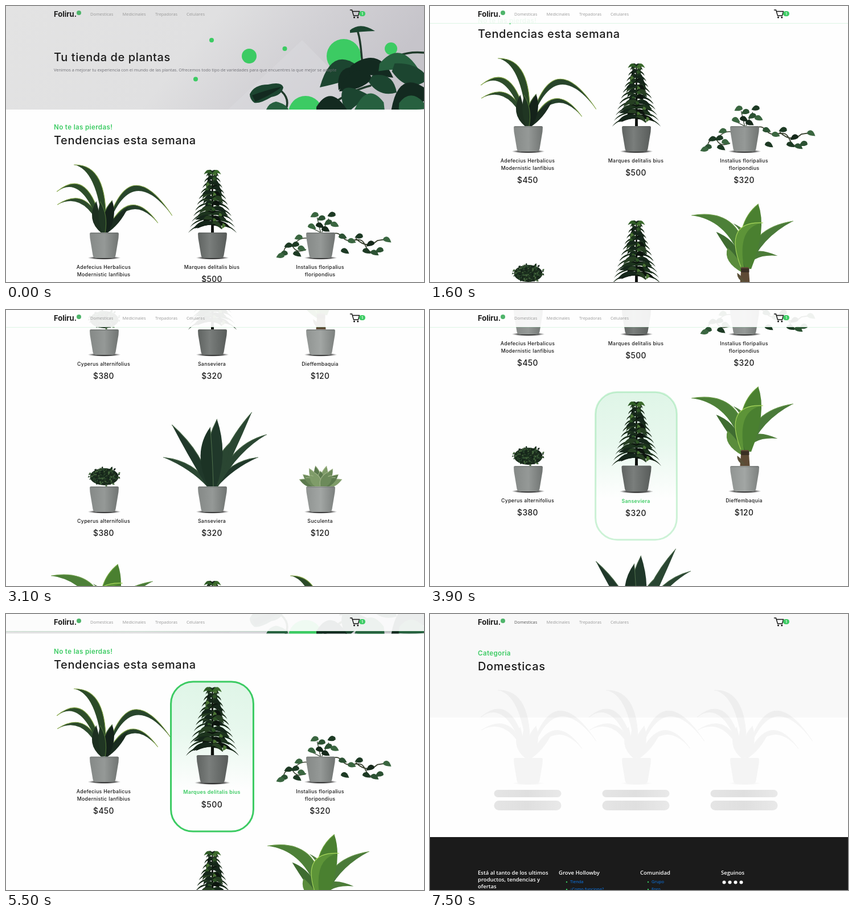
Recreate the animation shown at these times as an HTML page. Size 734 by 485 pixels, loop 8000 ms.

```html
<!DOCTYPE html>
<html lang="es">
<head>
<meta charset="utf-8">
<style>
html, body { margin: 0; width: 100%; height: 100%; overflow: hidden; background: #fefefe; }
svg { display: block; width: 734px; height: 485px; }
text { font-family: Inter, sans-serif; fill: #1b1b1b; white-space: pre; }
.title { font-size: 20px; font-weight: 500; letter-spacing: .03em; }
.kicker { font-size: 11.6px; font-weight: 600; letter-spacing: .03em; fill: #3ccb63; }
.name { font-size: 8.8px; font-weight: 500; letter-spacing: .03em; text-anchor: middle; }
.price { font-size: 13.8px; font-weight: 500; letter-spacing: .03em; text-anchor: middle; }
.hover .name { fill: #3ccb63; font-weight: 600; }
.logo { font-size: 13px; font-weight: 700; }
.small { font: 7.45px "Open Sans", sans-serif; fill: #6f6f75; }
.nav { fill: #999; }
.nav.on { fill: #555; }
.foot { font: 600 9.5px "Open Sans", sans-serif; fill: #fff; }
.link { fill: #0a7cf5; }
.skeleton { filter: brightness(0); opacity: .035; }
</style>
</head>
<body>
<svg id="stage" viewBox="0 0 734 485"></svg>
<script>
const GREEN = '#3ccb63', LOOP = 8000, PITCH = 276, FADE = 300;
const COLUMNS = [171.5, 361.5, 551.5];

let seed = 7;
const rnd = (a, b) => {
  seed = (seed * 16807) % 2147483647;
  return a + (b - a) * seed / 2147483647;
};
const pick = list => list[Math.floor(rnd(0, list.length))];
const text = (x, y, cls, s) => `<text x="${x}" y="${y}" class="${cls}">${s}</text>`;
const circle = (x, y, r, fill) => `<circle cx="${x}" cy="${y}" r="${r}" fill="${fill}"/>`;
const line = (d, color, w) => `<path d="${d}" fill="none" stroke="${color}" stroke-width="${w}" stroke-linecap="round"/>`;
const grad = (id, dir, stops) => `<linearGradient id="${id}" ${dir}>` +
  stops.map(([o, c]) => `<stop offset="${o}" stop-color="${c}"/>`).join('') + '</linearGradient>';

// Tapered blade from base to tip, bent towards a control point.
function leaf(x0, y0, cx, cy, x1, y1, w, fill, edge) {
  const len = Math.hypot(x1 - x0, y1 - y0) || 1;
  const nx = -(y1 - y0) / len * w, ny = (x1 - x0) / len * w;
  const p = (x, y, k) => `${(x + nx * k).toFixed(1)} ${(y + ny * k).toFixed(1)}`;
  const side = k => `M${p(x0, y0, k / 4)}Q${p(cx, cy, k)} ${x1.toFixed(1)} ${y1.toFixed(1)}`;
  return `<path d="${side(1)}Q${p(cx, cy, -1)} ${p(x0, y0, -.25)}Z" fill="${fill}"/>` +
    (edge ? line(side(x1 < x0 ? 1 : -1), edge, 1.1) : '');
}

function pot(fill, plant) {
  return `<ellipse cy="44.5" rx="29" ry="3.2" fill="url(#shade)"/>${plant}
    <path d="M-25.5 2Q-25.5 0 -23 0H23Q25.5 0 25.5 2L25 10 20 40Q19 45 14 45H-14Q-19 45 -20 40L-25 10Z" fill="url(#${fill})"/>
    <path d="M-24 1.5H24" stroke="#5b605d" opacity=".45"/>`;
}

function arching() {
  const edge = '#86a848';
  return leaf(-2, 0, -30, -80, -82, -49, 7, '#2c4a2c', edge) +
    leaf(4, 0, 45, -80, 94, -17, 7, '#25402a', edge) +
    leaf(-4, -5, -32, -112, -83, -72, 9, '#2d4d2a', edge) +
    leaf(5, -10, 45, -135, 119, -30, 9, '#28452b', edge) +
    leaf(0, -10, -3, -116, -53, -119, 11, '#2b4a28', edge) +
    leaf(-2, 0, -20, -25, -14, -55, 13, '#1d3020') +
    leaf(2, 0, 20, -20, 42, -44, 10, '#1a2c1f') +
    leaf(2, 0, 8, -30, 14, -56, 16, '#14221a', '#4f7438') +
    leaf(-1, 0, -4, -30, -7, -54, 11, '#203623', '#4f7438');
}

function conifer() {
  const tones = ['#0d150f', '#15261a', '#1c331d', '#263f22'];
  let out = '<path d="M-2.5 0L-1 -105H1L2.5 0Z" fill="#0b0f0b"/>';
  for (let i = 0; i < 11; i++) {
    const y = -106 + i * 9, w = 11 + i * 3.1;
    for (const s of [-1, 1]) {
      out += leaf(0, y, s * w * .7, y, s * w * 1.02, y + 8 + i * .9, 2.2, '#1a2d1b');
      for (let k = 0; k < 4; k++) {
        const r = w * rnd(.35, .82);
        out += leaf(0, y + rnd(-3, 3), s * r * .6, y - 3, s * r, y + rnd(1, 11), 6, pick(tones));
      }
    }
    const x = rnd(-.5, .5) * w;
    out += leaf(x, y, x + 3, y + 3, x + rnd(-6, 6), y + 9, 5, pick(['#4b7435', '#2f5527']));
  }
  return out + leaf(0, -103, -8, -112, -15, -102, 5, '#2f5c26') + leaf(0, -103, 8, -112, 15, -102, 5, '#3b6a2c');
}

function vine() {
  const tones = ['#1d3a24', '#2c5233', '#3a6640', '#16291b'];
  let out = line('M22 2C38 -2 36 14 50 14S72 8 78 22 92 38 104 33M62 11Q82 30 100 14L114 12', '#39412f', 1.8) +
    line('M-24 10C-40 8 -44 22 -56 24S-62 38 -70 40M-26 30Q-44 38 -50 22', '#39412f', 1.6) +
    line('M0 0L-6 -26M2 0L14 -24M0 0L-16 -8', '#2d3b2a', 1.2);
  const spots = [[-10, -30], [2, -24], [20, -30], [14, -17], [-16, -10], [24, -13], [-2, -12], [8, -5],
    [-38, 10], [-34, 29], [-44, 22], [-64, 38], [-70, 42], [-56, 24], [-42, 38],
    [38, 8], [42, 33], [54, 16], [68, 8], [80, 33], [94, 36], [104, 32], [116, 13], [88, 20]];
  for (const [x, y] of spots) {
    const s = rnd(0, 1) < .5 ? -1 : 1;
    out += leaf(x - s * 6, y - 2, x, y - 3, x + s * 8, y + rnd(1, 5), 8, pick(tones));
  }
  return out;
}

function bush() {
  let out = '<ellipse cy="-17" rx="25" ry="15" fill="#1a2b1c"/>';
  for (let i = 0; i < 150; i++) {
    const a = rnd(0, 6.28), r = Math.sqrt(rnd(0, 1));
    const x = Math.cos(a) * r * 27, y = -17 + Math.sin(a) * r * 16;
    out += leaf(x, y, x + 2, y - 1, x + rnd(-4, 4), y + rnd(-4, 4), 2.6, pick(['#2c4a2e', '#1a301e', '#47683f', '#14221a']));
  }
  return out;
}

function broad() {
  return leaf(2, -25, 8, -62, 58, -48, 11, '#4c7c38') +
    leaf(6, -28, 18, -88, 85, -109, 13, '#4a7a39', '#6f9c50') +
    leaf(2, -26, -12, -122, -93, -119, 17, '#4d8038', '#6d9c4a') +
    leaf(6, -26, 18, -82, -20, -105, 9, '#547f42') +
    leaf(4, -26, 10, -100, 24, -139, 30, '#4a8030', '#71a63f') +
    leaf(-2, -25, -22, -68, -50, -90, 13, '#3f6c31') +
    leaf(-1, -20, -28, -45, -30, -62, 13, '#5a8c3c') +
    leaf(-4, -28, -26, -104, 32, -106, 13, '#5d9438', '#a9d85c') +
    '<path d="M-8 0L-6 -28H7L9 0Z" fill="#5e4a35"/><path d="M-7 -26H8V-19H-6Z" fill="#3a2f24"/>' +
    leaf(0, -2, -10, -10, -13, -18, 5, '#5a5038');
}

function sword() {
  const edge = '#4c6b4a';
  const blades = [[-86, -51, 8], [80, -51, 8], [95, -91, 9], [-71, -108, 13], [69, -130, 13], [-14, -82, 18], [30, -76, 16], [8, -118, 25]];
  return blades.map(([x, y, w], i) =>
    leaf(x * .08, 0, x * .4, y * (Math.abs(x) > 75 ? .75 : .5), x, y, w, i % 2 ? '#20382a' : '#2a4632', edge)).join('') +
    leaf(-3, 0, -18, -60, -4, -104, 18, '#1c3325', edge);
}

function rosette() {
  const angles = [-78, 78, -55, 55, -32, 34, -14, 16, -66, 66, -42, 44, 0, -24, 24];
  return angles.map((deg, i) => {
    const a = deg * Math.PI / 180, l = i < 8 ? 38 : 28;
    const x = Math.sin(a) * l, y = -Math.cos(a) * l + (Math.abs(deg) > 60 ? -4 : 1);
    return leaf(x * .15, 0, x * .6, y * .5, x, y, 11, ['#5c7a4e', '#7f9c69', '#6c8a5a'][i % 3], '#a0b588');
  }).join('');
}

const plants = {
  arching: pot('stone', arching()), conifer: pot('slate', conifer()), vine: pot('stone', vine()),
  bush: pot('stone', bush()), broad: pot('pale', broad()), sword: pot('stone', sword()), rosette: pot('pale', rosette())
};

// plant, name, price, [hover start, hover end]
const catalogue = [
  ['arching', 'Adefecius Herbalicus|Modernistic lanfibius', 450, [4750, 5150]],
  ['conifer', 'Marques delitalis bius', 500, [5150, 5600]],
  ['vine', 'Instalius floripalius|floripondius', 320],
  ['bush', 'Cyperus alternifolius', 380, [4350, 4750]],
  ['conifer', 'Sanseviera', 320, [3840, 4350]],
  ['broad', 'Dieffembaquia', 120],
  ['bush', 'Cyperus alternifolius', 380],
  ['sword', 'Sanseviera', 320],
  ['rosette', 'Suculenta', 120],
  ['broad', 'Dieffembaquia', 120],
  ['conifer', 'Marques delitalis bius', 500],
  ['arching', 'Adefecius Herbalicus', 450]
];

function card([plant, name, price], i) {
  const x = COLUMNS[i % 3], y = Math.floor(i / 3) * PITCH, lines = name.split('|');
  const box = `x="${x - 70.5}" y="${y + 269}" width="142" height="258" rx="38"`;
  return `<g class="card"><g class="grow"><rect class="fill" ${box} fill="url(#mint)"/>
    <rect class="border" ${box} fill="none" stroke="${GREEN}" stroke-width="3"/></g>
    <g class="plant"><use href="#${plant}" x="${x + 1}" y="${y + 398}"/></g>
    <g class="grow">${lines.map((s, k) => text(x, y + 462.3 + k * 13, 'name', s)).join('')}
    ${text(x, y + 472.3 + lines.length * 13, 'price', '$' + price)}</g></g>`;
}

function hero() {
  const dark = '#132a20', mid = '#1c4530', lit = '#27603f';
  const dots = [[361, 60, 4], [427, 88, 13], [489.5, 75, 4], [333, 128.5, 4], [593, 88, 30], [676, 75, 11], [526, 188, 30], [640, 190, 25]];
  return `<g clip-path="url(#heroClip)"><rect width="734" height="182" fill="url(#wall)"/>
    <path d="M390 182L520 60 640 182Z" fill="#dcdbe0" opacity=".5"/>
    ${dots.map(d => circle(...d, GREEN)).join('')}
    ${line('M618 46C626 70 622 100 632 130M734 82Q690 78 664 104M484 150Q500 165 490 185M560 182Q600 150 640 140', '#203a2b', 3.5)}
    ${leaf(604, 45, 622, 36, 648, 44, 9, mid)}
    <path d="M428 155Q436 138 460 138 484 132 487 143 484 157 466 160 446 172 436 170 428 164 428 155Z" fill="${mid}"/>
    <path d="M432 157Q458 147 484 142 470 154 438 168Z" fill="${dark}"/>
    <path d="M457 182Q462 170 474 168 492 172 496 182Z" fill="${lit}"/>
    ${leaf(620, 112, 585, 102, 551, 143, 34, mid)}${leaf(616, 110, 592, 118, 584, 148, 18, dark)}
    ${leaf(604, 112, 650, 95, 680, 126, 27, dark)}${leaf(655, 108, 690, 82, 728, 117, 26, lit)}
    ${leaf(640, 122, 612, 126, 585, 150, 26, dark)}${leaf(680, 108, 716, 128, 742, 128, 30, mid)}
    ${leaf(640, 128, 668, 138, 686, 152, 26, mid)}${leaf(596, 182, 592, 150, 640, 158, 32, mid)}
    ${leaf(664, 176, 638, 158, 612, 182, 26, lit)}${leaf(742, 154, 704, 142, 676, 186, 36, dark)}
    ${leaf(545, 184, 570, 162, 600, 184, 26, dark)}${leaf(690, 176, 712, 162, 742, 180, 22, lit)}
    ${text(84, 97, 'title', 'Tu tienda de plantas')}
    ${text(84, 115, 'small', 'Venimos a mejorar tu experiencia con el mundo de las plantas. Ofrecemos todo tipo de variedades para que encuentres la que mejor se adapte')}</g>`;
}

function category() {
  const slots = COLUMNS.map(x => `<g class="skeleton"><use href="#arching" x="${x + 1}" y="253"/></g>
    <rect x="${x - 59}" y="309" width="118" height="13" rx="6.5" fill="url(#bar)"/>
    <rect x="${x - 59}" y="328" width="118" height="17" rx="8.5" fill="url(#bar)"/>`).join('');
  const links = (x, list) => list.map((s, k) =>
    circle(x + 14, 471 + k * 13, 1.2, GREEN) + text(x + 20, 473.3 + k * 13, 'small link', s)).join('');
  return `<rect width="734" height="485" fill="#fefefe"/><rect width="734" height="182" fill="#f8f8f8"/>
    ${text(84, 73, 'kicker', 'Categoria')}${text(84, 99, 'title', 'Domesticas')}${slots}
    <rect y="392" width="734" height="93" fill="#1b1b1b"/>
    ${['Está al tanto de los ultimos', 'productos, tendencias y', 'ofertas'].map((s, k) => text(84, 458 + k * 12, 'foot', s)).join('')}
    ${text(226, 458, 'foot', 'Grove Hollowby')}${links(226, ['Tienda', '¿Como funciona?'])}
    ${text(369, 458, 'foot', 'Comunidad')}${links(369, ['Grupo', 'Foro'])}
    ${text(511, 458, 'foot', 'Seguinos')}${[516.5, 526.5, 536.5, 546.5].map(x => circle(x, 471.5, 3, '#fff')).join('')}`;
}

const header = `<g id="bar-bg"><rect width="734" height="30" fill="#fefefe" opacity=".92"/>
    <path d="M0 30.5H734" stroke="${GREEN}" opacity=".16"/></g>
  ${text(84, 18.7, 'logo', 'Foliru.')}${circle(128, 12, 4, '#4fb56b')}
  ${[[148, 'Domesticas'], [204.5, 'Medicinales'], [262, 'Trepadoras'], [317, 'Celulares']].map(([x, s]) => text(x, 17, 'small nav', s)).join('')}
  ${line('M604.5 7H607.5L610.5 17H618.5L620.5 9.5H608.5', '#111', 1.4)}${circle(611.5, 20, 1.5, '#111')}${circle(617.8, 20, 1.5, '#111')}
  <rect x="620" y="9" width="11" height="9" rx="4.5" fill="${GREEN}"/>
  <text x="625.5" y="15.8" style="font-size:6px;font-weight:700;fill:#fff;text-anchor:middle">1</text>`;

const stage = document.getElementById('stage');
stage.innerHTML = `<defs>
  ${grad('stone', '', [[0, '#858987'], [.5, '#959997'], [1, '#707472']])}
  ${grad('slate', '', [[0, '#5f6361'], [.4, '#7a7e7c'], [1, '#585c5a']])}
  ${grad('pale', '', [[0, '#909492'], [.5, '#a2a6a4'], [1, '#7c807e']])}
  ${grad('mint', 'x2="0" y2="1"', [[0, '#dff5e7'], [.35, '#e8f8ee'], [.72, '#fefefe']])}
  ${grad('wall', 'y2=".2"', [[0, '#e3e3e3'], [.5, '#e0e0e1'], [.75, '#d2d1d5'], [1, '#c6c4ca']])}
  ${grad('bar', '', [[0, '#e5e5e5'], [.5, '#dfdfdf'], [1, '#e9e9e9']])}
  <radialGradient id="shade"><stop offset=".5" stop-color="#222"/><stop offset="1" stop-color="#222" stop-opacity="0"/></radialGradient>
  <clipPath id="heroClip"><rect width="734" height="182"/></clipPath>
  ${Object.entries(plants).map(([id, art]) => `<g id="${id}">${art}</g>`).join('')}</defs>
  <g id="shop">${hero()}${text(84, 217, 'kicker', 'No te las pierdas!')}${text(84, 243, 'title', 'Tendencias esta semana')}
  ${catalogue.map(card).join('')}</g><g id="category">${category()}</g>${header}`;

const get = id => document.getElementById(id);
const shop = get('shop'), categoryPage = get('category'), barBg = get('bar-bg'), shimmer = get('bar');
const navLinks = stage.querySelectorAll('.nav');
const cards = [...stage.querySelectorAll('.card')];

// [time, scroll offset]
const scrollKeys = [[0, 0], [1100, 0], [1200, 6], [1300, 40], [1400, 88], [1600, 187], [1700, 205], [1800, 210],
  [1900, 210], [2000, 225], [2300, 430], [2400, 475], [2500, 484], [2700, 484], [2800, 495], [3100, 640],
  [3200, 675], [3400, 700], [3500, 700], [3600, 688], [3900, 400], [4000, 340], [4100, 300], [4200, 280],
  [4400, 262], [4500, 258], [4600, 245], [4800, 201], [4900, 190], [5000, 186], [5100, 186], [5200, 182],
  [5500, 147.5], [5700, 50], [5800, 12], [5900, 0], [LOOP, 0]];

function scrollAt(t) {
  const i = scrollKeys.findIndex(([time]) => time > t);
  const [t0, s0] = scrollKeys[i - 1], [t1, s1] = scrollKeys[i];
  return s0 + (s1 - s0) * (t - t0) / (t1 - t0);
}
const ramp = u => { u = Math.min(1, Math.max(0, u)); return u * u * (3 - 2 * u); };
const zoom = (x, y, k) => `translate(${x} ${y}) scale(${k}) translate(${-x} ${-y})`;

function poseCard(el, i, t) {
  const [start, end] = catalogue[i][3] || [LOOP, LOOP];
  const amount = ramp((t - start + 40) / FADE) - ramp((t - end) / FADE);
  const hovered = t >= start && t < end;
  const x = COLUMNS[i % 3], y = Math.floor(i / 3) * PITCH;
  el.classList.toggle('hover', hovered);
  el.querySelector('.fill').style.opacity = hovered ? 1 : 0;
  el.querySelector('.border').style.opacity = amount;
  el.querySelectorAll('.grow').forEach(g => g.setAttribute('transform', zoom(x, y + 398, 1 + .02 * amount)));
  el.querySelector('.plant').setAttribute('transform', zoom(x + 1, y + 425, 1 + .088 * amount));
}

function render(t) {
  const scroll = scrollAt(t), onCategory = t >= 7200;
  shop.setAttribute('transform', `translate(0 ${-scroll})`);
  shop.style.display = onCategory ? 'none' : '';
  categoryPage.style.display = onCategory ? '' : 'none';
  barBg.style.display = scroll > 0 ? '' : 'none';
  navLinks[0].classList.toggle('on', t >= 6900);
  navLinks[1].classList.toggle('on', t >= 6800 && t < 6900);
  shimmer.setAttribute('gradientTransform', `translate(${t >= 7500 ? 0 : -.4})`);
  cards.forEach((el, i) => poseCard(el, i, t));
}

const began = performance.now();
let shown = -1;
function tick() {
  const t = Math.floor((performance.now() - began) % LOOP / 100) * 100;
  if (t !== shown) render(shown = t);
  requestAnimationFrame(tick);
}
tick();
</script>
</body>
</html>
```
